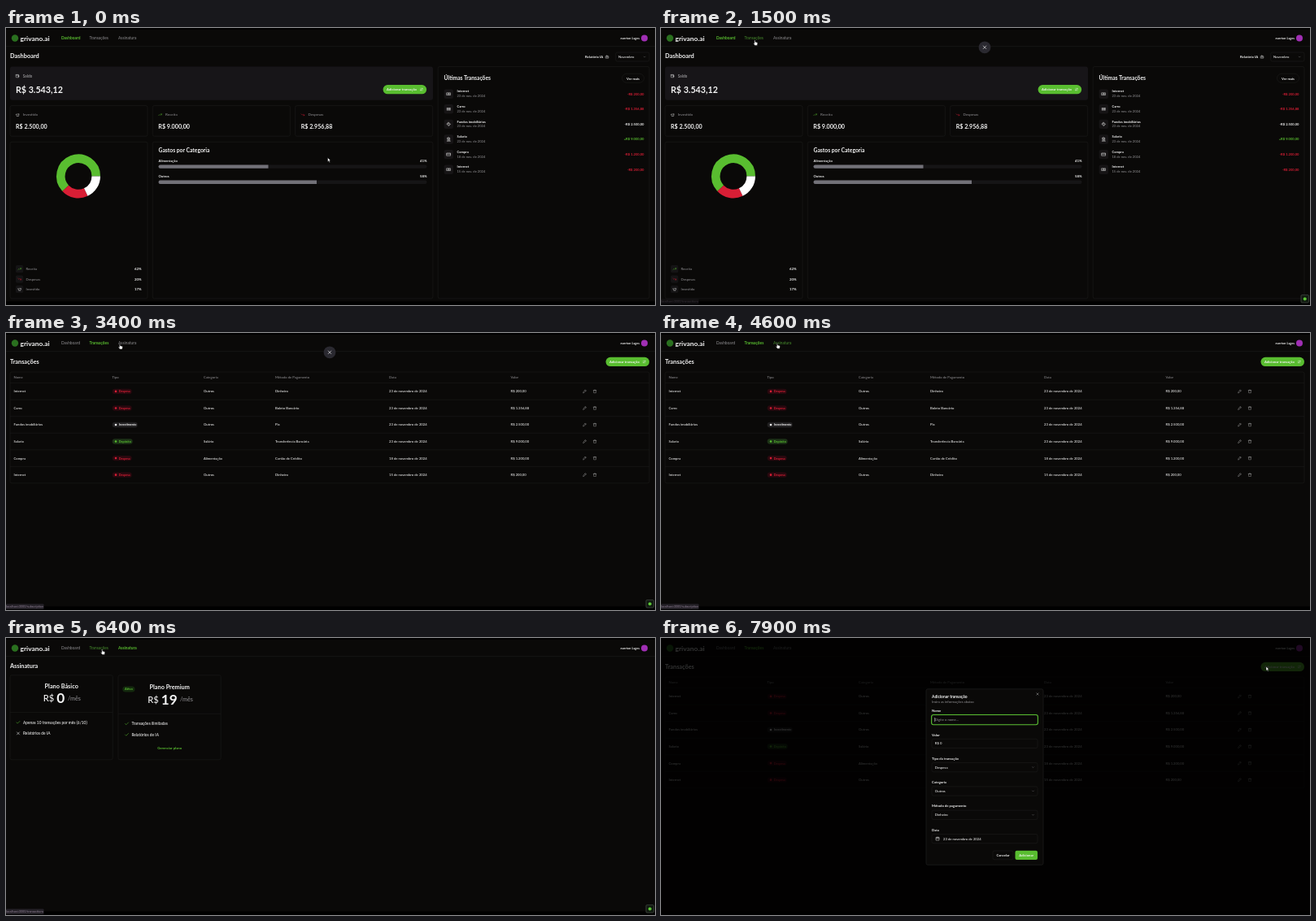
Write an HTML page that moves like this. It is 798 px wide and 341 px high and loops after 8 s.

```html
<!DOCTYPE html>
<html lang="pt-BR">
<head>
<meta charset="utf-8">
<title>Painel financeiro</title>
<style>
html, body { margin: 0; width: 100%; height: 100%; overflow: hidden; background: #000; }
svg { display: block; width: 100vw; height: 100vh; font-family: Lato, "Open Sans", sans-serif; }
text { white-space: pre; }
</style>
</head>
<body>
<svg id="stage" viewBox="0 0 798 341"></svg>
<script>
const BG = '#0a0908', LINE = '#1e1d1c', GREEN = '#59bd30', RED = '#d81e35',
      GREY = '#8b8a8d', WHITE = '#f4f4f4';

// 24-unit line icons
const ICONS = {
  wallet: 'M19 7V4H5a2 2 0 0 0 0 4h15v4M3 6v13a2 2 0 0 0 2 2h15v-5M18 12a2 2 0 0 0 0 4h4v-4z',
  pig: 'M19 6c-2 0-3 1-4 2-5-1-11 0-11 5 0 2 0 3 3 5v3h4v-2h4v2h4v-4l3-3v-4h-2zM2 9v1l2 2',
  up: 'M22 7l-8.5 8.5-5-5L2 17M16 7h6v6',
  down: 'M22 17l-8.5-8.5-5 5L2 7M16 17h6v-6',
  swap: 'M3 16l4 4 4-4M7 20V4M21 8l-4-4-4 4M17 4v16',
  bot: 'M12 8V4H8M4 8h16v12H4zM9 13v2M15 13v2',
  chevron: 'M6 9l6 6 6-6',
  cash: 'M2 6h20v12H2zM12 9a3 3 0 1 0 .1 0M6 12h.1M18 12h.1',
  barcode: 'M3 6v12M6 6v12M10 6v12M14 6v12M17 6v12M21 6v12',
  diamond: 'M12 2l10 10-10 10L2 12zM12 7l5 5-5 5-5-5z',
  bank: 'M3 22h18M6 18v-7M10 18v-7M14 18v-7M18 18v-7M12 2l8 5H4z',
  card: 'M2 5h20v14H2zM2 10h20',
  pencil: 'M17 3l4 4L8 20l-6 2 2-6zM14 6l4 4',
  trash: 'M3 6h18M19 6v15H5V6M8 6V3h8v3',
  check: 'M20 6L9 17l-5-5',
  cross: 'M18 6L6 18M6 6l12 12',
  calendar: 'M3 4h18v18H3zM3 10h18M8 2v4M16 2v4'
};

const text = (x, y, s, size = 4.2, fill = WHITE, weight = 500, anchor = 'start') =>
  `<text x="${x}" y="${y}" font-size="${size}" fill="${fill}" font-weight="${weight}" text-anchor="${anchor}">${s}</text>`;
const bold = (x, y, s, size, fill, anchor) => text(x, y, s, size, fill, 700, anchor);
const box = (x, y, w, h, r = 2, fill = 'none', stroke = LINE) =>
  `<rect x="${x}" y="${y}" width="${w}" height="${h}" rx="${r}" fill="${fill}" stroke="${stroke}" stroke-width=".6"/>`;
const fillBox = (x, y, w, h, r, fill) => box(x, y, w, h, r, fill, 'none');
const icon = (name, cx, cy, size = 5, color = WHITE) =>
  `<path d="${ICONS[name]}" transform="translate(${cx - size / 2} ${cy - size / 2}) scale(${size / 24})" fill="none" stroke="${color}" stroke-width="2.2" stroke-linecap="round" stroke-linejoin="round"/>`;
const group = (id, body) => `<g id="${id}">${body}</g>`;
const hline = (x1, x2, y) => `<path d="M${x1} ${y}H${x2}" stroke="${LINE}" stroke-width=".6"/>`;
const addButton = (x, y) => fillBox(x, y, 53.5, 11.3, 5.6, GREEN) +
  bold(x + 4.5, y + 7.2, 'Adicionar transação', 4.2) + icon('swap', x + 47.3, y + 5.6, 4.4);

function donut(cx, cy, r, width, parts) {
  let a = 0;
  const at = v => `${cx + r * Math.cos(v * 2 * Math.PI)} ${cy - r * Math.sin(v * 2 * Math.PI)}`;
  return parts.map(([share, color]) => {
    const d = `M${at(a)}A${r} ${r} 0 ${+(share > .5)} 0 ${at(a += share)}`;
    return `<path d="${d}" fill="none" stroke="${color}" stroke-width="${width}"/>`;
  }).join('');
}

// name, kind, category, method, day, amount, icon
const ROWS = [
  ['Internet', 'Despesa', 'Outros', 'Dinheiro', 23, '200,00', 'cash'],
  ['Carro', 'Despesa', 'Outros', 'Boleto Bancário', 23, '1.356,88', 'barcode'],
  ['Fundos imobiliários', 'Investimento', 'Outros', 'Pix', 23, '2.500,00', 'diamond'],
  ['Salario', 'Depósito', 'Salário', 'Transferência Bancária', 23, '9.000,00', 'bank'],
  ['Compra', 'Despesa', 'Alimentação', 'Cartão de Crédito', 18, '1.200,00', 'card'],
  ['Internet', 'Despesa', 'Outros', 'Dinheiro', 15, '200,00', 'cash']
];
const KINDS = {
  Despesa: { color: RED, back: '#2a090f', width: 24, sign: '-' },
  Investimento: { color: WHITE, back: '#222122', width: 31, sign: '-' },
  'Depósito': { color: GREEN, back: '#1d3317', width: 25, sign: '+' }
};

function header() {
  return '<circle cx="11" cy="12.5" r="4.2" fill="#2a701f"/>' + bold(17.5, 15.6, 'grivano.ai', 8.4) +
    ['Dashboard', 'Transações', 'Assinatura'].map((s, i) =>
      group('nav' + i, text([68, 102.5, 138][i], 14, s, 4.85, 'inherit', 'inherit'))).join('') +
    bold(779, 13.8, 'everton Lages', 3.8, WHITE, 'end') +
    '<circle cx="785" cy="12.5" r="4" fill="#a02fb4"/>' + hline(0, 798, 22.6);
}

function dashboard() {
  const summary = [
    [5, 'pig', 'Investido', '2.500,00', WHITE],
    [180.3, 'up', 'Receita', '9.000,00', GREEN],
    [355.7, 'down', 'Despesas', '2.956,88', RED]
  ].map(([x, ic, label, value, color]) => box(x, 95.6, 169, 37.6) + icon(ic, x + 9.2, 106.8, 4.6, color) +
    text(x + 15.8, 108.3, label, 4.5, GREY) + bold(x + 7, 124.3, 'R$ ' + value, 7.15)).join('');

  const legend = [['up', 'Receita', 62, GREEN], ['down', 'Despesas', 20, RED], ['pig', 'Investido', 17, WHITE]]
    .map(([ic, label, pct, color], i) => {
      const y = 296.7 + i * 12.4;
      return fillBox(12, y - 4.6, 9.2, 9.2, 1.6, '#151415') + icon(ic, 16.6, y, 4.6, color) +
        text(24.5, y + 1.5, label, 4.2, GREY) + bold(166.6, y + 1.5, pct + '%', 4.3, WHITE, 'end');
    }).join('');

  const bars = [['Alimentação', 41, 135], ['Outros', 58, 194.5]].map(([label, pct, w], i) => {
    const y = 168.4 + i * 19.1;
    return bold(187.5, y - 3.2, label, 4.2) + bold(517.6, y - 3.2, pct + '%', 4.3, WHITE, 'end') +
      fillBox(187.5, y, 330, 4.4, 2.2, '#161516') +
      `<path d="M189.7 ${y}H${187.5 + w}v4.4H189.7a2.2 2.2 0 0 1 0-4.4" fill="#727178"/>`;
  }).join('');

  const recent = ROWS.map(([name, kind, , , day, amount, ic], i) => {
    const y = 81 + i * 18.6, k = KINDS[kind];
    return fillBox(538.6, y - 5.5, 11.4, 11.4, 2, '#161415') + icon(ic, 544.3, y + .2, 5.4) +
      bold(554.5, y - 1.6, name, 4.1) + text(554.5, y + 4.1, day + ' de nov. de 2024', 4.1, GREY) +
      bold(784.5, y + 1.5, `${k.sign}R$ ${amount}`, 4.15, k.color, 'end');
  }).join('');

  return bold(5, 37, 'Dashboard', 7.4) +
    bold(712, 37.1, 'Relatório IA', 4.2) + icon('bot', 739.2, 35.5, 4.8) +
    box(749.7, 30, 41.3, 11) + text(753, 37.1, 'Novembro', 4.2) + icon('chevron', 785.2, 35.6, 4, GREY) +
    fillBox(5, 47.6, 520, 41.2, 3, '#171518') + icon('wallet', 14, 59, 4.8) +
    text(20.8, 60.8, 'Saldo', 4.8, '#aaa9ac') + bold(12, 79.7, 'R$ 3.543,12', 10.7) + addButton(463.6, 70) +
    summary +
    box(5, 140.3, 169, 192.7) +
    donut(89, 182.4, 21.7, 10.6, [[.62, GREEN], [.2, RED], [.18, '#fff']]) + legend +
    box(180.3, 140.3, 344.6, 192.7) + bold(187.5, 153.3, 'Gastos por Categoria', 6.75) + bars +
    box(531.2, 47.6, 259.8, 285.4) + bold(538.5, 63.8, 'Últimas Transações', 6.75) +
    box(757.5, 56.3, 27, 11, 5.5) + bold(771, 63.5, 'Ver mais', 4.2, WHITE, 'middle') + recent;
}

function transactions() {
  const cols = [9.5, 130.5, 243, 331, 471, 620.5];
  const heads = ['Nome', 'Tipo', 'Categoria', 'Método de Pagamento', 'Data', 'Valor']
    .map((s, i) => text(cols[i], 56.3, s, 4.2, GREY)).join('');
  const rows = ROWS.map(([name, kind, category, method, day, amount], i) => {
    const y = 71.9 + i * 20.55, k = KINDS[kind];
    const cells = [name, '', category, method, day + ' de novembro de 2024', 'R$ ' + amount]
      .map((s, c) => s && text(cols[c], y + 1.4, s, 4.2)).join('');
    return (i ? hline(5, 791, y - 10.3) : '') + cells +
      fillBox(130.7, y - 3.2, k.width, 6.4, 3.2, k.back) +
      `<circle cx="135" cy="${y}" r="1.3" fill="${k.color}"/>` + bold(138.8, y + 1.4, kind, 3.7, k.color) +
      icon('pencil', 711.6, y, 4.8, '#aaa') + icon('trash', 724, y, 4.8, '#aaa');
  }).join('');
  return bold(5, 37.6, 'Transações', 7.3) + addButton(737.5, 29.8) +
    group('rowHover', fillBox(5, 48, 786, 13.5, 2, '#171516')) +
    box(5, 48, 786, 136.8, 2) + hline(5, 791, 61.6) + heads + rows;
}

function plans() {
  const plan = (x, dy, name, price, priceX, unitX) =>
    box(x, 45.8, 126.2, 104) + hline(x, x + 126.2, 91.6 + dy) +
    bold(x + 63.2, 61.6 + dy, name, 7.3, WHITE, 'middle') +
    text(priceX - 16.5, 77.8 + dy, 'R$', 11.2) + bold(priceX, 80.3 + dy, price, 17.2) +
    text(unitX, 76.6 + dy, '/mês', 7.2, GREY);
  const item = (x, y, ok, s) => icon(ok ? 'check' : 'cross', x, y, 6, ok ? GREEN : WHITE) + text(x + 6, y + 1.6, s, 4.8);
  return bold(5, 36.8, 'Assinatura', 7.3) +
    plan(5, 0, 'Plano Básico', '0', 62.2, 76) + plan(138, 1.7, 'Plano Premium', '19', 190.7, 214) +
    fillBox(143.3, 59.4, 15.2, 7.2, 3.6, '#142a0e') + bold(150.9, 64.4, 'Ativo', 4, GREEN, 'middle') +
    item(15, 103.9, 1, 'Apenas 10 transações por mês (6/10)') + item(15, 117.4, 0, 'Relatórios de IA') +
    item(148.5, 105.5, 1, 'Transações ilimitadas') + item(148.5, 119, 1, 'Relatórios de IA') +
    bold(201.2, 136.8, 'Gerenciar plano', 4.3, GREEN, 'middle');
}

function modal() {
  const fields = [['Nome', 'Digite o nome...'], ['Valor', 'R$ 0'], ['Tipo da transação', 'Despesa'],
    ['Categoria', 'Outros'], ['Método de pagamento', 'Dinheiro'], ['Data', '23 de novembro de 2024']]
    .map(([label, value], i) => {
      const y = 95 + i * 29.3;
      return bold(333, y - 3.8, label, 4.2) + box(333, y, 130, 11.2, 2, BG) +
        (i ? '' : `<rect x="332.6" y="94.5" width="130.8" height="12.2" rx="2.4" fill="none" stroke="${GREEN}" stroke-width="1.1"/>` +
          '<path d="M336.7 98v5.2" stroke="#fff" stroke-width=".5"/>') +
        text(i == 5 ? 347 : 336.8, y + 7.1, value, 4.2, i ? WHITE : GREY) +
        (i > 1 && i < 5 ? icon('chevron', 457.5, y + 5.6, 4, GREY) : '') +
        (i == 5 ? icon('calendar', 340.2, y + 5.5, 4.8) : '');
    }).join('');
  return box(326, 62.8, 144, 216.5, 2, BG, '#242322') + icon('cross', 463, 69, 4.6, '#ccc') +
    bold(333, 73.8, 'Adicionar transação', 4.95) + text(333, 80.3, 'Insira as informações abaixo', 4.2, GREY) + fields +
    box(408, 262, 25, 10.8) + bold(420.5, 268.9, 'Cancelar', 4.2, WHITE, 'middle') +
    fillBox(435.5, 261.8, 27.5, 11.2, 2, GREEN) + bold(449.2, 268.9, 'Adicionar', 4.2, WHITE, 'middle');
}

const outline = 'fill="#fff" stroke="#000" stroke-width=".5" stroke-linejoin="round"';
stage.innerHTML = fillBox(0, 0, 798, 341, 0, '#000') + fillBox(0, 2, 798, 334.5, 0, BG) + header() +
  group('page0', dashboard()) + group('page1', transactions()) + group('page2', plans()) +
  group('badge', box(787, 328.7, 9.4, 9.4, 1, '#101a10', '#555a55') + '<circle cx="791.7" cy="333.5" r="2" fill="#5cc437"/>') +
  group('status', fillBox(0, 333.4, 46.5, 6.6, 1, '#242127') + '<text id="link" x="0" y="338" font-size="3.75" fill="#8d7d92"></text>') +
  group('exit', '<circle cx="398" cy="23.8" r="7.4" fill="#2a2930"/>' + icon('cross', 398, 23.8, 7)) +
  group('shade', fillBox(0, 0, 798, 341, 0, '#000')) + group('dialog', modal()) +
  group('cursor', `<path id="arrow" d="M0 0V5.2L1.2 4.2 2.1 6.1 3 5.7 2.1 3.8H3.7Z" ${outline}/>` +
    `<path id="hand" d="M.2 .6q.6-.8 1.1 0V2.5L3.6 3.1Q4.4 3.4 4.2 4.5L3.7 6.8H.8L-1 4.3q0-.8 1.2 0Z" ${outline}/>`);

const $ = id => document.getElementById(id);
const show = (id, alpha) => $(id).setAttribute('opacity', +alpha);
const clamp = v => Math.min(1, Math.max(0, v));

// time, x, y of the pointer tip
const PATH = [[500, 395.5, 159.5], [1400, 114.6, 14.6], [2700, 114.6, 14.6], [3300, 139.2, 13.2], [3700, 139.2, 13.2],
  [4300, 142.2, 12.4], [5800, 142.2, 12.4], [6300, 117.5, 13.6], [6800, 117.5, 13.6], [7200, 735, 48.2], [7600, 744, 35]];

function pointer(t) {
  const i = PATH.findIndex(k => k[0] > t);
  if (i < 1) return PATH[i ? PATH.length - 1 : 0].slice(1);
  const [t0, x0, y0] = PATH[i - 1], [t1, x1, y1] = PATH[i];
  const p = (t - t0) / (t1 - t0), e = p * p * (3 - 2 * p);
  return [x0 + (x1 - x0) * e, y0 + (y1 - y0) * e];
}

function draw(now) {
  const t = Math.floor(now % 8000 / 100) * 100;
  const within = (a, b) => t >= a && t < b;
  const page = t < 1800 ? 0 : t < 5000 ? 1 : t < 6800 ? 2 : 1;
  const hover = within(1400, 1800) ? 1 : within(4500, 5000) ? 2 : within(6300, 6800) ? 1 : -1;
  for (let i = 0; i < 3; i++) {
    show('page' + i, i == page);
    const nav = $('nav' + i);
    nav.setAttribute('fill', i == page ? GREEN : i == hover ? '#43852b' : '#858487');
    nav.setAttribute('font-weight', i == page ? 700 : 500);
  }
  show('badge', within(1200, 3800) || within(5000, 7700));
  show('exit', within(1200, 3800));
  show('status', within(1400, 1600) ? .35 : within(1600, 5900) || within(6300, 7400));
  $('link').textContent = 'localhost:3000/' + (within(3200, 6200) ? 'subscription' : 'transactions');
  const open = clamp((t - 7600) / 200);
  show('shade', open * .8);
  show('dialog', open);
  const zoom = .95 + .05 * open;
  $('dialog').setAttribute('transform', `translate(398 171) scale(${zoom}) translate(-398 -171)`);
  const [x, y] = pointer(t), hand = y < 19 && x > 100 && x < 162;
  $('cursor').setAttribute('transform', `translate(${x} ${y})`);
  show('hand', hand);
  show('arrow', !hand);
  show('rowHover', y > 48 && y < 61.5);
}

const start = performance.now();
(function tick() {
  draw(performance.now() - start);
  requestAnimationFrame(tick);
})();
</script>
</body>
</html>
```
